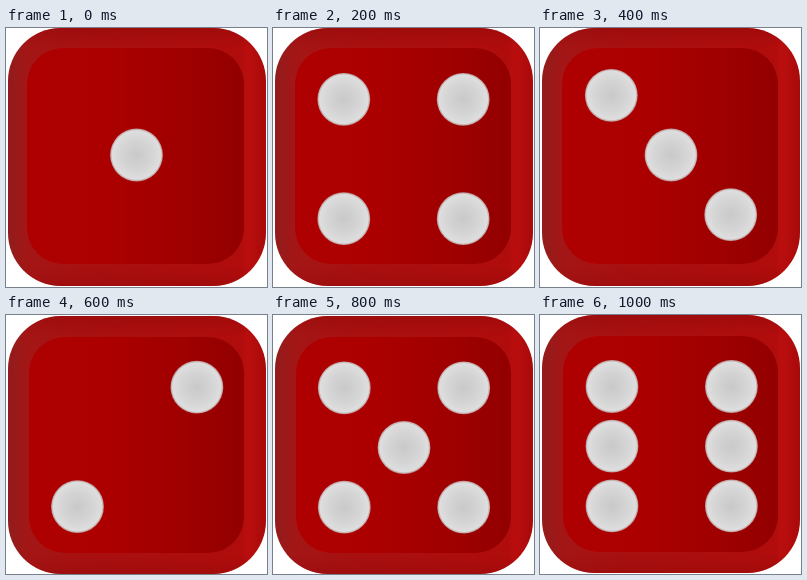
These frames come from a looping animation (261x259 px, 1200 ms). An HTML page with a canvas:

```html
<!DOCTYPE html>
<html>
<head>
<meta charset="utf-8">
<style>
html, body { margin: 0; width: 100%; height: 100%; overflow: hidden; background: #fff; }
canvas { display: block; }
</style>
</head>
<body>
<canvas id="die" width="261" height="259"></canvas>
<script>
const ctx = document.getElementById('die').getContext('2d');
const STEP = 200, GAP = 59.7, PIP = 26.4, RIGHT = 238;

// Each throw: face corner, pip centre, pips as [column, row]
const throws = [
  { face: [21, 20], mid: [130.5, 127], pips: [[0, 0]] },
  { face: [22, 20], mid: [130.5, 131], pips: [[-1, -1], [1, -1], [-1, 1], [1, 1]] },
  { face: [22, 20], mid: [131, 127], pips: [[-1, -1], [0, 0], [1, 1]] },
  { face: [23, 22], mid: [131.2, 131.9], pips: [[1, -1], [-1, 1]] },
  { face: [23, 22], mid: [131, 132.5], pips: [[-1, -1], [1, -1], [0, 0], [-1, 1], [1, 1]] },
  { face: [23, 21], mid: [131.7, 131.2], pips: [[-1, -1], [1, -1], [-1, 0], [1, 0], [-1, 1], [1, 1]] }
];

function linear(x0, y0, x1, y1, stops) {
  const g = ctx.createLinearGradient(x0, y0, x1, y1);
  stops.forEach(([at, color]) => g.addColorStop(at, color));
  return g;
}

function box(x, y, w, h, r, fill) {
  ctx.beginPath();
  ctx.roundRect(x, y, w, h, r);
  ctx.fillStyle = fill;
  ctx.fill();
}

function pip(x, y) {
  const g = ctx.createRadialGradient(x, y, 0, x, y, PIP);
  g.addColorStop(0, '#c9c9c9');
  g.addColorStop(0.6, '#d5d5d5');
  g.addColorStop(0.92, '#dedede');
  g.addColorStop(1, '#b89090');
  ctx.beginPath();
  ctx.arc(x, y, PIP, 0, Math.PI * 2);
  ctx.fillStyle = g;
  ctx.fill();
}

function draw({ face: [fx, fy], mid: [mx, my], pips }) {
  ctx.fillStyle = '#fff';
  ctx.fillRect(0, 0, 261, 259);
  const top = Math.max(0, fy - 21);
  const body = [2, top, 258, 258, 53];
  box(...body, linear(2, 0, 260, 0,
    [[0, '#921c1c'], [0.08, '#a41616'], [0.3, '#a81010'], [0.9, '#b00c0c'], [0.93, '#ba0e0e'], [1, '#a80a0a']]));
  box(...body, linear(0, top, 0, top + 258,
    [[0, 'rgba(150,10,10,.6)'], [0.08, 'rgba(160,10,10,0)'], [0.92, 'rgba(160,10,10,0)'], [1, 'rgba(150,10,10,.5)']]));
  box(fx, fy, RIGHT - fx, 216, 36, linear(fx, 0, RIGHT, 0,
    [[0, '#ae0000'], [0.35, '#ac0000'], [0.7, '#a00000'], [1, '#920000']]));
  pips.forEach(([col, row]) => pip(mx + col * GAP, my + row * GAP));
}

let start;
function tick(now) {
  start ??= now;
  draw(throws[Math.floor((now - start) / STEP) % throws.length]);
  requestAnimationFrame(tick);
}
draw(throws[0]);
requestAnimationFrame(tick);
</script>
</body>
</html>
```
